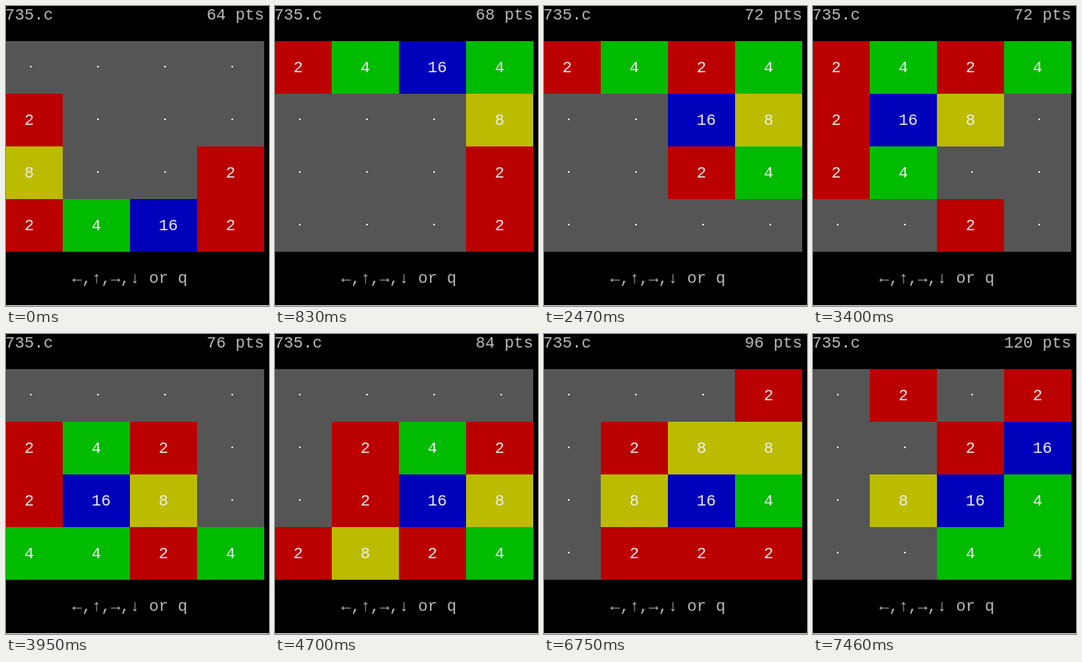
Recreate the animation shown at these times as an HTML page with a canvas. Size 329 by 376 pixels, loop 8 s.

```html
<!DOCTYPE html>
<html lang="en">
<head>
<meta charset="utf-8">
<title>Number tiles</title>
<style>
html, body { margin: 0; width: 329px; height: 376px; overflow: hidden; background: #000; }
canvas { display: block; }
</style>
</head>
<body>
<canvas id="stage" width="329" height="376"></canvas>
<script>
const LOOP = 8000, CHAR = 12, LINE = 22, LEFT = -13, BASELINE = 17;
const COLORS = { 0: '#555', 2: '#b00', 4: '#0b0', 8: '#bb0', 16: '#00b' };
const ctx = document.getElementById('stage').getContext('2d');

// move time, direction, time of the new 2, its cell
const turns = [
  [300, 'up', 420, 13],
  [830, 'right', 950, 10],
  [1380, 'down', 1510, 6],
  [2470, 'up', 2620, 5],
  [3280, 'left', 3400, 14],
  [3830, 'down', 3950, 4],
  [4540, 'right', 4700, 12],
  [5410, 'up', 5560, 12],
  [6010, 'right', 6130, 9],
  [6750, 'down', 6880, 12],
  [7310, 'right', 7460, 1]
];

// Cell indices of line i, starting at the wall the tiles slide towards
function lineCells(dir, i) {
  const vertical = dir === 'up' || dir === 'down';
  const cells = [0, 1, 2, 3].map(k => vertical ? k * 4 + i : i * 4 + k);
  return dir === 'down' || dir === 'right' ? cells.reverse() : cells;
}

function move({ board, score }, dir) {
  const next = Array(16).fill(0);
  for (let i = 0; i < 4; i++) {
    const cells = lineCells(dir, i);
    const tiles = cells.map(c => board[c]).filter(Boolean);
    for (let k = 0; k < tiles.length; k++) {
      if (tiles[k] === tiles[k + 1]) {
        tiles[k] *= 2;
        score += tiles[k];
        tiles.splice(k + 1, 1);
      }
      next[cells[k]] = tiles[k];
    }
  }
  return { board: next, score };
}

function play() {
  let state = { board: [0, 0, 0, 0, 2, 0, 0, 0, 8, 0, 0, 2, 2, 4, 16, 2], score: 64 };
  const states = [{ time: 0, ...state }];
  for (const [moveTime, dir, addTime, cell] of turns) {
    state = move(state, dir);
    states.push({ time: moveTime, ...state });
    state = { board: state.board.with(cell, 2), score: state.score };
    states.push({ time: addTime, ...state });
  }
  return states;
}

function text(str, x, lineTop, color) {
  ctx.fillStyle = color;
  ctx.fillText(str, x, lineTop + BASELINE);
}

function draw({ board, score }) {
  ctx.fillStyle = '#000';
  ctx.fillRect(0, 0, 329, 376);
  ctx.fillStyle = '#ddd';
  ctx.fillRect(0, 375, 329, 1);
  ctx.font = '20px "Liberation Mono", monospace';

  const points = score + ' pts';
  text('735.c', LEFT + CHAR, 0, '#bbb');
  text(points, 323 - CHAR * points.length, 0, '#bbb');
  text('←,↑,→,↓ or q', LEFT + 8 * CHAR, 15 * LINE, '#bbb');

  board.forEach((value, i) => {
    const x = LEFT + (i % 4) * 7 * CHAR;
    const y = (2 + Math.floor(i / 4) * 3) * LINE;
    ctx.fillStyle = COLORS[value];
    ctx.fillRect(x, y, 7 * CHAR, 3 * LINE);
    if (value) {
      text(value, x + 3 * CHAR, y + LINE, '#eee');
    } else {
      ctx.fillStyle = '#eee';
      ctx.fillRect(x + 43, y + 31, 2, 2);
    }
  });
}

const states = play();
function frame() {
  const t = performance.now() % LOOP;
  draw(states.findLast(s => s.time <= t));
  requestAnimationFrame(frame);
}
frame();
</script>
</body>
</html>
```
